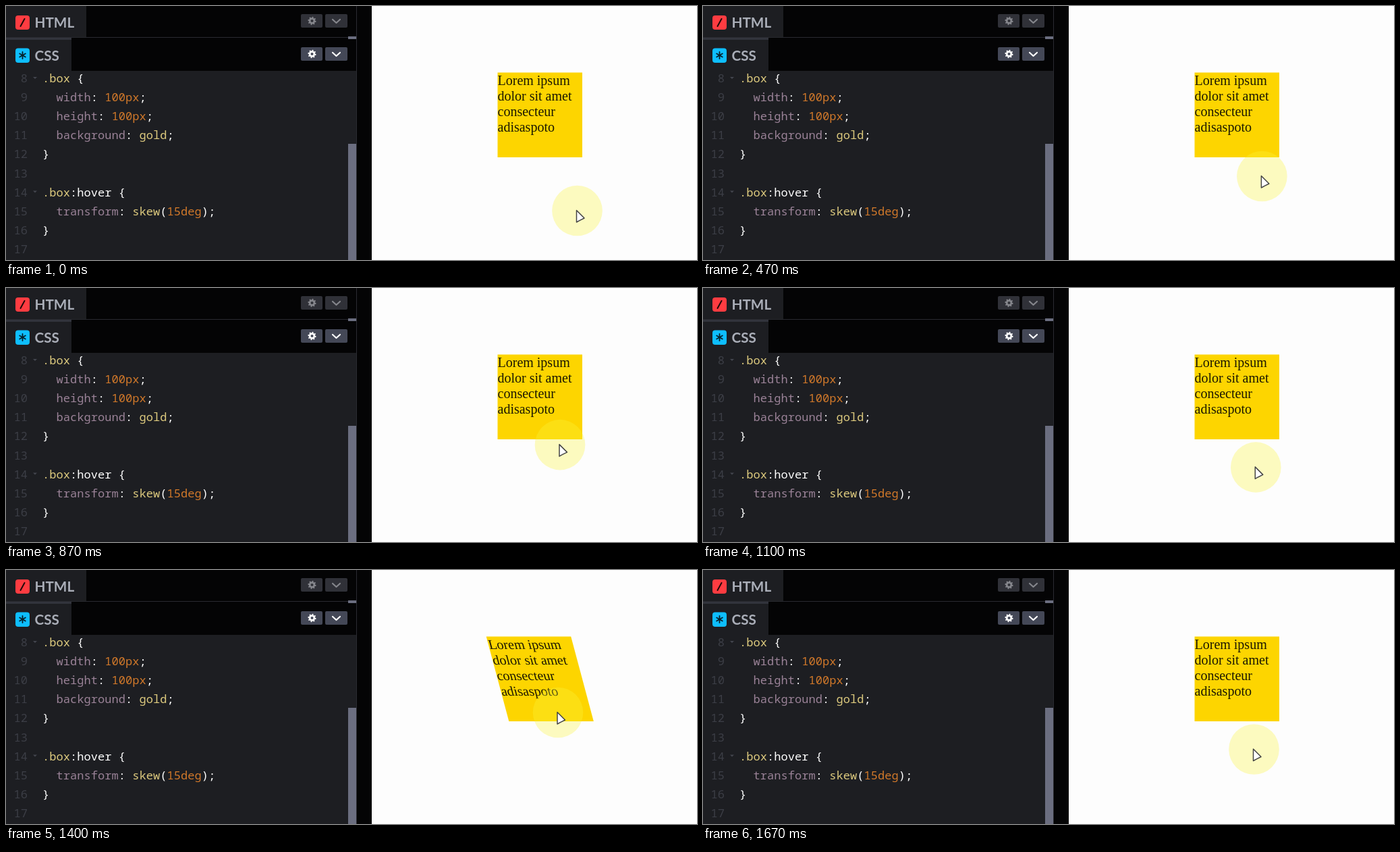
Recreate the animation shown at these times as an HTML page with a canvas. Size 1024 by 376 pixels, loop 1910 ms.

```html
<!DOCTYPE html>
<html lang="en">
<head>
<meta charset="utf-8">
<title>Skew on hover</title>
<style>
  html, body { margin: 0; width: 100%; height: 100%; overflow: hidden; background: #fdfdfd; }
  canvas { display: block; }
</style>
</head>
<body>
<canvas id="stage" width="1024" height="376"></canvas>
<script>
const ctx = document.getElementById('stage').getContext('2d');
const LOOP = 1910;
const BOX = { x: 728.5, y: 98.5, size: 125.5 };
const WORDS = ['Lorem ipsum', 'dolor sit amet', 'consecteur', 'adisaspoto'];
const MONO = '17.08px "Noto Sans Mono", "DejaVu Sans Mono", monospace';

const PANEL = '#1d1e22', THUMB = '#6b6e80', LABEL = '#aaaeb8';
const SEL = '#ddca7e', PROP = '#9a8297', NUM = '#d0782a', PLAIN = '#fff';

// Each code line is a list of [text, colour] runs.
const prop = (name, ...value) => [['  ' + name, PROP], [': ', PLAIN], ...value, [';', PLAIN]];
const CODE = [
  [['.box', SEL], [' {', PLAIN]],
  prop('width', ['100px', NUM]),
  prop('height', ['100px', NUM]),
  prop('background', ['gold', SEL]),
  [['}', PLAIN]],
  [],
  [['.box', SEL], [':hover {', PLAIN]],
  prop('transform', ['skew', SEL], ['(', PLAIN], ['15deg', NUM], [')', PLAIN]),
  [['}', PLAIN]],
  []
];

// Pointer path: time, x, y
const PATH = [
  [0, 846.5, 303], [30, 846.5, 304], [110, 846, 312], [200, 848, 311],
  [390, 848, 311], [430, 844, 285], [470, 828.5, 252.5], [570, 821, 218],
  [680, 819, 208], [780, 820, 218], [870, 821, 232], [930, 821, 240],
  [1050, 819, 277], [1200, 820, 228], [1400, 818, 211], [1460, 818, 211],
  [1670, 816.5, 265.5], [LOOP, 816.5, 265.5]
];

function slope(i, k) {
  if (i === 0 || i === PATH.length - 1) return 0;
  const [a, b, c] = PATH.slice(i - 1, i + 2);
  const d0 = (b[k] - a[k]) / (b[0] - a[0]);
  const d1 = (c[k] - b[k]) / (c[0] - b[0]);
  return d0 * d1 > 0 ? 2 * d0 * d1 / (d0 + d1) : 0;
}

// Monotone cubic interpolation of one coordinate
function along(t, k) {
  let i = 0;
  while (i < PATH.length - 2 && t >= PATH[i + 1][0]) i++;
  const a = PATH[i], b = PATH[i + 1], h = b[0] - a[0];
  const u = (t - a[0]) / h, v = 1 - u;
  return v * v * (1 + 2 * u) * a[k] + u * u * (3 - 2 * u) * b[k]
    + h * u * v * (v * slope(i, k) - u * slope(i + 1, k));
}

function rect(x, y, w, h, fill) {
  ctx.fillStyle = fill;
  ctx.fillRect(x, y, w, h);
}

function round(x, y, w, h, r, fill) {
  ctx.fillStyle = fill;
  ctx.beginPath();
  ctx.roundRect(x, y, w, h, r);
  ctx.fill();
}

function line(points, width, stroke) {
  ctx.strokeStyle = stroke;
  ctx.lineWidth = width;
  ctx.beginPath();
  points.forEach(([x, y]) => ctx.lineTo(x, y));
  ctx.stroke();
}

function text(str, x, y, fill) {
  ctx.fillStyle = fill;
  ctx.fillText(str, x, y);
}

function gear(x, y, fill, hole) {
  ctx.fillStyle = fill;
  ctx.beginPath();
  for (let i = 0; i < 32; i++) {
    const a = (i + 0.5) * Math.PI / 16, r = i % 4 < 2 ? 6.2 : 4.6;
    ctx.lineTo(x + r * Math.cos(a), y + r * Math.sin(a));
  }
  ctx.fill();
  ctx.fillStyle = hole;
  ctx.beginPath();
  ctx.arc(x, y, 2, 0, 7);
  ctx.fill();
}

function buttons(y, fill, icon) {
  round(437, y, 32, 20, 2, fill);
  round(473, y, 33, 20, 2, fill);
  gear(453.5, y + 10, icon, fill);
  ctx.lineCap = ctx.lineJoin = 'round';
  line([[484, y + 8], [489.5, y + 13], [495, y + 8]], 2.2, icon);
}

function tabs() {
  rect(0, 0, 542, 376, '#040405');
  rect(0, 0, 119, 46, PANEL);
  rect(0, 46, 519, 1, '#292a30');
  rect(0, 47, 97, 49, PANEL);
  rect(0, 47, 97, 3, '#32343c');

  round(14, 14, 21, 21, 4, '#ff3c41');
  round(14, 62.5, 21, 21.5, 4, '#0ebeff');
  ctx.lineCap = 'round';
  line([[27.5, 19], [21.5, 30]], 2, '#200a0a');
  for (let i = 0; i < 3; i++) {
    const a = Math.PI * (i / 3 + 0.5), dx = 5 * Math.cos(a), dy = 5 * Math.sin(a);
    line([[24.5 - dx, 73 - dy], [24.5 + dx, 73 + dy]], 1.8, '#06202a');
  }

  ctx.font = 'bold 20.7px Lato, sans-serif';
  text('HTML', 42.5, 32, LABEL);
  text('CSS', 42.5, 81, LABEL);
  buttons(12, '#303138', '#85868c');
  buttons(61, '#444857', '#fff');
}

function editor() {
  rect(0, 96, 519, 280, PANEL);
  rect(507, 45, 12, 4, THUMB);
  rect(507, 204, 12, 172, THUMB);
  rect(519, 0, 1, 376, '#2a2b31');
  ctx.font = MONO;
  CODE.forEach((runs, i) => {
    const y = 113 + 28.1 * i;
    ctx.textAlign = 'right';
    text(String(8 + i), 32, y, '#3c3e46');
    ctx.textAlign = 'left';
    if (i % 6 === 0) {
      ctx.fillStyle = '#44464f';
      ctx.beginPath();
      ctx.moveTo(40, y - 8);
      ctx.lineTo(46, y - 8);
      ctx.lineTo(43, y - 5);
      ctx.fill();
    }
    let x = 54;
    for (const [str, fill] of runs) {
      text(str, x, y, fill);
      x += ctx.measureText(str).width;
    }
  });
}

function box(hover) {
  const half = BOX.size / 2;
  ctx.save();
  ctx.translate(BOX.x + half, BOX.y + half);
  if (hover) ctx.transform(1, 0, Math.tan(Math.PI / 12), 1, 0, 0);
  rect(-half, -half, BOX.size, BOX.size, '#fdd500');
  ctx.font = '20px "Liberation Serif", "Times New Roman", serif';
  WORDS.forEach((str, i) => text(str, -half, 18.5 - half + 23 * i, '#1c1800'));
  ctx.restore();
}

function pointer(x, y) {
  ctx.fillStyle = 'rgba(249, 242, 60, 0.32)';
  ctx.beginPath();
  ctx.arc(x, y, 37.3, 0, 7);
  ctx.fill();

  ctx.save();
  ctx.translate(x - 1, y - 0.5);
  ctx.beginPath();
  [[0, 0], [0, 17.5], [4.8, 14.8], [11.5, 11.5]].forEach(([px, py]) => ctx.lineTo(px, py));
  ctx.closePath();
  ctx.fillStyle = '#fff';
  ctx.fill();
  ctx.lineJoin = 'round';
  ctx.lineWidth = 1.5;
  ctx.strokeStyle = '#454545';
  ctx.stroke();
  ctx.restore();
}

function draw(now) {
  const t = now % LOOP;
  const x = along(t, 1), y = along(t, 2);
  rect(0, 0, 1024, 376, '#fdfdfd');
  tabs();
  editor();
  box(y < BOX.y + BOX.size);
  pointer(x, y);
}

const start = performance.now();
function tick() {
  draw(performance.now() - start);
  requestAnimationFrame(tick);
}
tick();
</script>
</body>
</html>
```
